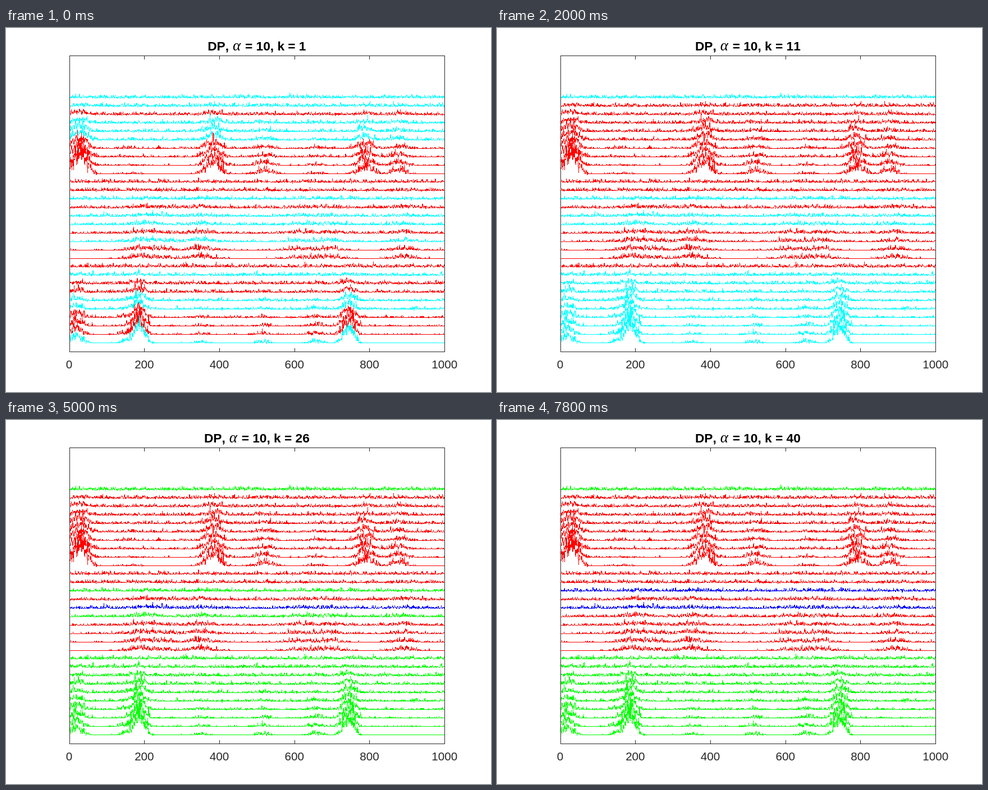
An HTML page that plays this animation: 864x648 px, repeating every 8 s.

```html
<!DOCTYPE html>
<html lang="en">
<head>
<meta charset="utf-8">
<title>DP clustering</title>
<style>
  html, body { margin: 0; width: 100%; height: 100%; overflow: hidden; background: #fff; }
  svg { display: block; width: 864px; height: 648px; }
  text { font-family: "Liberation Sans", Arial, sans-serif; font-kerning: none; white-space: pre; }
  .tick { font-size: 20.6px; fill: #262626; text-anchor: middle; }
  .title { font-size: 22.7px; font-weight: bold; }
  .alpha { font-family: "Liberation Serif", serif; font-size: 27px; font-style: italic; text-anchor: middle; }
  path { fill: none; stroke-width: 1; shape-rendering: crispEdges; }
</style>
</head>
<body>
<svg id="stage" viewBox="0 0 864 648"></svg>
<script>
const stage = document.getElementById('stage');
const STEP = 200, STEPS = 40, ROWS = 30, GROUP = 10, POINTS = 1000;
const UNIT = 1.8, FLAT = 1.6;
const px = v => 112.9 + 0.6686 * v;

function add(tag, attrs, text = '') {
  const el = document.createElementNS('http://www.w3.org/2000/svg', tag);
  for (const key in attrs) el.setAttribute(key, attrs[key]);
  el.textContent = text;
  return stage.appendChild(el);
}

function randomFrom(seed) {
  return () => {
    seed = (seed + 0x6D2B79F5) | 0;
    let t = Math.imul(seed ^ (seed >>> 15), 1 | seed);
    t = (t + Math.imul(t ^ (t >>> 7), 61 | t)) ^ t;
    return ((t ^ (t >>> 14)) >>> 0) / 4294967296;
  };
}

function poisson(mean, random) {
  const limit = Math.exp(-mean);
  let n = 0;
  for (let p = random(); p > limit; p *= random()) n++;
  return n;
}

// One profile per group of rows; peaks map a position to a height in px
const profiles = [
  { width: 14, peaks: { 20: 15, 150: 4, 186: 31, 350: 2, 515: 3, 655: 5, 744: 28 } },
  { width: 26, peaks: { 190: 5, 250: 3, 350: 5, 610: 3, 685: 4, 890: 4 } },
  { width: 18, peaks: { 28: 34, 165: 1, 383: 23, 520: 7, 660: 2, 788: 15, 878: 8 } }
];

function level({ width, peaks }, v) {
  let sum = 0;
  for (const at in peaks) sum += peaks[at] * Math.exp(-(((v - at) / width) ** 2) / 2);
  return sum;
}

// Within a group the profile fades into flat noise
function trace(row) {
  const random = randomFrom(row);
  const profile = profiles[Math.floor((row - 1) / GROUP)];
  const flat = ((row - 1) % GROUP) / (GROUP - 1);
  const fade = (1 - flat) ** 1.4;
  const base = 576 - row * 527 / 35;
  const points = [];
  for (let v = 1; v <= POINTS; v++) {
    const mean = fade * level(profile, v) + flat * FLAT;
    const y = base - UNIT * poisson(mean / UNIT, random);
    points.push(px(v).toFixed(2) + ' ' + y.toFixed(2));
  }
  return 'M' + points.join('L');
}

// Lower rows lie on top
const lines = [];
for (let row = ROWS; row >= 1; row--) lines[row - 1] = add('path', { d: trace(row) });

let axes = 'M113.5 49.5H781.5V576.5H113.5Z';
for (let v = 0; v <= POINTS; v += 200) {
  const x = Math.floor(px(v)) + 0.5;
  if (v % POINTS) axes += `M${x} 576.5v-6.5M${x} 49.5v6.5`;
  add('text', { class: 'tick', x: px(v) - 0.3, y: 606 }, v);
}
add('path', { d: axes, stroke: '#262626' });

const head = add('text', { class: 'title', y: 40 }, 'DP,');
const alpha = add('text', { class: 'alpha', y: 40 }, 'α');
const tail = add('text', { class: 'title', y: 40 });

// Cluster letter of every row, bottom row first
function clusters(k) {
  if (k < 3) return 'crrrccrrcr' + 'rrcrccrcrr' + 'rrrrcccrcc';
  const low = k < 9 ? 'ccrccrcccr' : k < 21 ? 'cccccccccr' : 'cccccccccc';
  const mid = k < 24 ? 'rrrrccrcrr' : k < 29 ? 'rrrrcbrcrr' : k < 33 ? 'rrrrrbrcrr' : 'rrrrrbrbrr';
  return low + mid + 'rrrrrrrrrc';
}

function draw(k) {
  const state = clusters(k);
  // Hues spread evenly over the clusters in use
  const colors = { r: '#f00', c: state.includes('b') ? '#0f0' : '#0ff', b: '#00f' };
  lines.forEach((line, i) => line.setAttribute('stroke', colors[state[i]]));

  const left = 446.9 - (k < 10 ? 87.7 : 94);
  head.setAttribute('x', left);
  alpha.setAttribute('x', left + 52);
  tail.setAttribute('x', left + 66.8);
  tail.textContent = `= 10, k = ${k}`;
}

let shown = 0;
const begin = performance.now();
function tick() {
  const k = 1 + Math.floor((performance.now() - begin) / STEP) % STEPS;
  if (k !== shown) draw(shown = k);
  requestAnimationFrame(tick);
}
tick();
</script>
</body>
</html>
```
